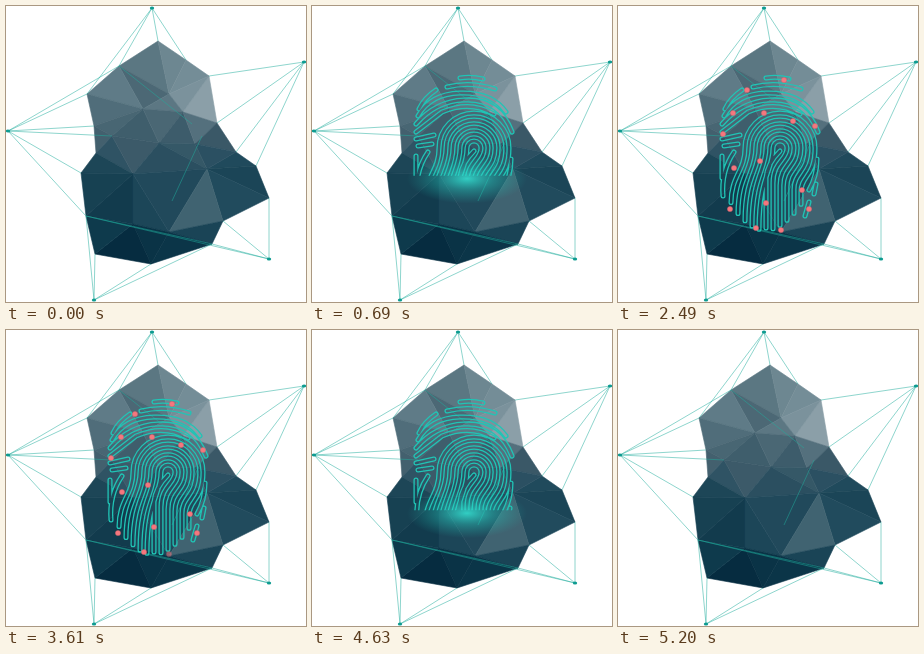
Animation of 300 by 296 pixels, one loop 5.67 s. Source, as an HTML page:

```html
<!DOCTYPE html>
<html lang="en">
<head>
<meta charset="utf-8">
<title>Fingerprint scan</title>
<style>
  html, body { margin: 0; width: 100%; height: 100%; overflow: hidden; background: #fff; }
  svg { display: block; width: 100%; height: 100%; }
</style>
</head>
<body>
<svg viewBox="0 0 300 296">
  <defs>
    <radialGradient id="light">
      <stop offset="0" stop-color="#35e6d6" stop-opacity=".85"/>
      <stop offset=".45" stop-color="#27c9bd" stop-opacity=".42"/>
      <stop offset="1" stop-color="#20b5aa" stop-opacity="0"/>
    </radialGradient>
    <clipPath id="revealed"><rect id="window" width="300" height="0"/></clipPath>
    <mask id="ridges" maskUnits="userSpaceOnUse" x="0" y="0" width="300" height="296">
      <g fill="none" stroke-linecap="round">
        <path class="ridge" stroke="#fff" stroke-width="5.1"/>
        <path class="ridge" stroke="#000" stroke-width="2.5"/>
      </g>
    </mask>
  </defs>
  <g id="rock" stroke-width=".6" stroke-linejoin="round"></g>
  <path id="web" fill="none" stroke="#20ad9c" stroke-width=".6" stroke-opacity=".85"/>
  <g id="nodes" fill="#0d9b90"></g>
  <g clip-path="url(#revealed)">
    <rect width="300" height="296" fill="#20c4b5" mask="url(#ridges)"/>
  </g>
  <ellipse id="glow" cx="155" rx="60" ry="25" fill="url(#light)"/>
  <g id="dots"></g>
</svg>
<script>
const LOOP = 5670;
const byId = id => document.getElementById(id);
const clamp = v => Math.max(0, Math.min(1, v));

function add(parent, tag, attrs) {
  const node = document.createElementNS('http://www.w3.org/2000/svg', tag);
  for (const key in attrs) node.setAttribute(key, attrs[key]);
  return byId(parent).appendChild(node);
}

// Corners of the rock: a to q run round the outline, the rest lie inside.
const corner = {
  a: '152 35', b: '180 54', c: '203 70', d: '211 117', e: '230 146', f: '250 160',
  g: '263 192', h: '217 215', i: '206 238', j: '145 258', k: '89 248', l: '80 210',
  m: '75 167', n: '90 147', o: '88 120', p: '81 88', q: '113 60',
  r: '163 88', s: '137 103', t: '106 130', u: '153 137', v: '177 106',
  w: '127 168', x: '201 163', y: '163 226', z: '189 138', I: '127 218'
};
const facets = `qar 5b7782,abr 6d8791,bcr 748d97,cdv 8b9fa8,cvr 7b929c,qrs 4c6875,pqs 5f7b87,
  pso 506d7a,ost 486673,stu 3f5e6c,svr 5c7783,suv 4a6774,vuz 3d5c6b,vdz 54707d,dez 3a5867,
  efx 204a5c,zex 2b5062,fgx 1b4557,xgh 214b5d,not 43606e,ntw 2f5364,tuw 3c5a69,uzx 355867,
  uxw 2b4f60,mnw 1d4657,mwl 174152,wlI 123b4d,wIy 1c4658,wxy 21495b,xhy 406371,yhi 1a4456,
  yij 0b3548,Iyj 0a3346,Ijk 062c40,lkI 0e3a4c`;
for (const facet of facets.split(',')) {
  const [names, hex] = facet.trim().split(' ');
  const points = [...names].map(name => corner[name]).join(' ');
  add('rock', 'polygon', { points, fill: '#' + hex, stroke: '#' + hex });
}

// Each outer node is tied to some corners of the rock.
const nodes = { '146 2': 'pqab', '298 56': 'cdef', '2 125': 'qpotml', '263 253': 'ghil', '88 294': 'lkji' };
let web = `M${corner.q}L186 118M196 130L166 195M${corner.l}L${corner.i}`;
for (const at in nodes) {
  for (const name of nodes[at]) web += `M${at}L${corner[name]}`;
  const [cx, cy] = at.split(' ');
  add('nodes', 'ellipse', { cx, cy, rx: 2.2, ry: 1.6 });
}
byId('web').setAttribute('d', web);

// Fingerprint: nested loops whose legs end on an oval, with free ridges around them.
const ovalBottom = x => 149 + 76 * Math.sqrt(1 - ((x - 152) / 50) ** 2);
function loopRidge(r) {
  const left = 148 - r, right = 148 + r, from = 162 - r, to = 162 + r;
  return `M${left} ${ovalBottom(left)}C${left} 170 ${from} 165 ${from} 142` +
    `A${r} ${r} 0 0 1 ${to} 142C${to} ${150 + r * .6} ${right} ${152 + r * .5} ${right} ${175 + r * .3}` +
    `V${ovalBottom(right) - r * .3}`;
}
const freeRidges = `M148 72Q159 70 171 73M135 81Q158 75 183 83M124 84Q112 92 107 103
  M106 110Q118 88 148 87Q180 86 194 106M104 118Q124 95 152 94Q187 92 200 126
  M104 126Q112 120 130 106Q158 94 182 108M104 133L122 129M106 140L120 138
  M105 190Q103 165 116 146M148 222V172Q149 158 162 145M104 150V172
  M199 153Q199 170 191 184M198 178L196 188M191 196L187 210`;
const ridges = [7, 14, 21, 28, 35].map(loopRidge).join('') + freeRidges;
document.querySelectorAll('.ridge').forEach(path => path.setAttribute('d', ridges));

// Marked points, in the order they appear and vanish.
const dots = [
  [163, 224], [138, 222], [191, 203], [148, 197], [184, 184], [142, 155], [197, 120], [175, 115],
  [112, 203], [116, 162], [105, 128], [146, 107], [115, 107], [129, 84], [166, 74]
].map(([cx, cy]) => add('dots', 'circle', { cx, cy, r: 2.6, fill: '#f5777e', stroke: '#d9606b', 'stroke-width': .4 }));

const TOP = 52, BOTTOM = 279;
function draw(t) {
  const down = clamp((t - 30) / 1320);
  const up = clamp((t - 4160) / 1040);
  const line = TOP + (BOTTOM - TOP) * (down - up);
  const phase = up > 0 ? up : down;
  byId('window').setAttribute('height', line + 4);
  byId('glow').setAttribute('cy', line + 7);
  byId('glow').setAttribute('opacity', clamp(Math.min(phase, 1 - phase) / .16));

  dots.forEach((dot, i) => {
    const shown = clamp((t - 1520 - i * 61) / 110);
    const gone = clamp((t - 3570 - i * 46 - (i > 9 ? 120 : 0)) / 85);
    dot.setAttribute('opacity', shown * (1 - gone));
  });
}

const start = performance.now();
function tick() {
  draw((performance.now() - start) % LOOP);
  requestAnimationFrame(tick);
}
tick();
</script>
</body>
</html>
```
